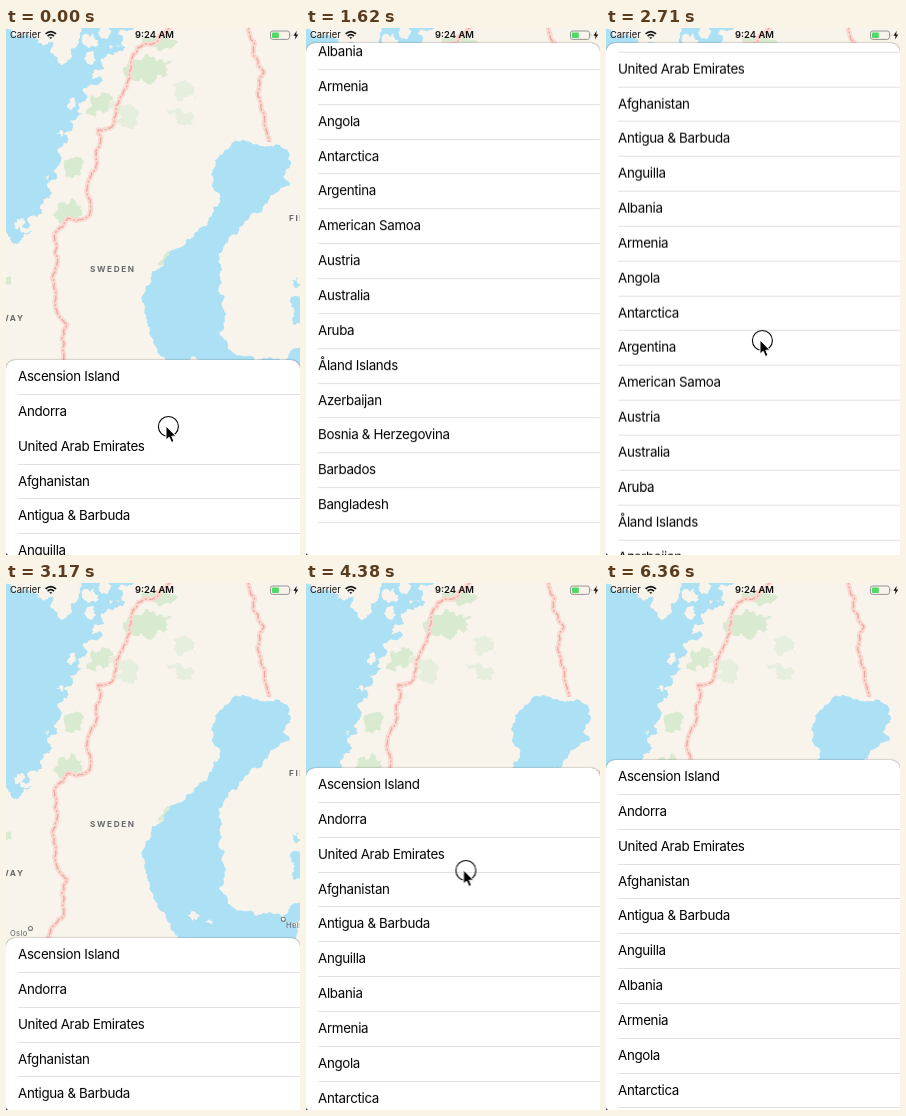
An HTML page that plays this animation: 294 px wide and 527 px high, repeating every 6.46 s.

```html
<!DOCTYPE html>
<html lang="en">
<head>
<meta charset="utf-8">
<title>Map with pull-up list</title>
<style>
  html, body { margin: 0; width: 100%; height: 100%; overflow: hidden; background: #f8f4ec; }
  body { position: relative; font-family: Inter, Roboto, sans-serif; }
  svg { position: absolute; left: 0; top: 0; overflow: visible; }

  .water { fill: #ace1f5; }
  .land { fill: #f8f4ec; }
  .park { fill: #d8ead0; }
  .faint { fill: #e6eedd; }
  .border { fill: none; stroke: #f9d9d1; stroke-width: 5; stroke-linejoin: round; }
  .border.dash { stroke: #eda89f; stroke-width: 1.3; stroke-dasharray: 7 2 2 2; }
  .country { font-weight: 700; font-size: 8.2px; letter-spacing: 1.6px; fill: #68686a; }
  .city { font-weight: 500; font-size: 7.6px; letter-spacing: .3px; fill: #77777a; }
  .dot { fill: #fff; stroke: #77777a; stroke-width: 1.1; }
  .status { font-size: 9.4px; fill: #111; }

  #sheet {
    position: absolute; left: 0; top: 0; width: 100%; height: 600px;
    background: #fff; border-radius: 9px 9px 0 0; overflow: hidden;
    box-shadow: 0 0 1.5px rgba(0, 0, 0, .65);
    animation: sheet 6460ms linear infinite;
  }
  #list {
    margin: 0; padding: 0 0 0 12px; list-style: none;
    font-size: 13.33px; letter-spacing: -.32px; color: #000;
    animation: scroll 6460ms linear infinite;
  }
  #list li {
    box-sizing: border-box; height: 34.85px; line-height: 33.8px;
    border-bottom: 1px solid #e1e1e3; white-space: nowrap;
  }
  #list li:nth-child(2) { animation: divider 6460ms step-end infinite; }

  #corner {
    position: absolute; left: 0; bottom: 0; width: 3px; height: 3px;
    background: radial-gradient(circle at 100% 0, transparent 2.6px, #4c4a6a 3.2px);
  }
  #pointer { width: 1px; height: 1px; animation: pointer 6460ms linear infinite; }
  #ring { fill: none; stroke: #000; stroke-width: 1.1; animation: press 6460ms step-end infinite; }

  @keyframes sheet {
    0%, 13.93% { transform: translateY(332px); }
    15.48% { transform: translateY(308px); }
    17.34% { transform: translateY(234px); }
    19.04% { transform: translateY(110px); }
    20.43%, 43.19% { transform: translateY(15px); }
    45.67% { transform: translateY(170px); }
    47.21% { transform: translateY(325px); }
    48.14% { transform: translateY(364px); }
    49.07% { transform: translateY(355px); }
    51.08% { transform: translateY(340px); }
    53.41% { transform: translateY(333.5px); }
    55.73%, 60.37% { transform: translateY(332px); }
    61.92% { transform: translateY(302px); }
    64.24% { transform: translateY(243px); }
    66.25% { transform: translateY(201px); }
    67.8% { transform: translateY(185px); }
    69.66%, 100% { transform: translateY(177px); }
  }
  @keyframes scroll {
    0%, 20.43% { transform: none; }
    22.45% { transform: translateY(-95px); }
    24.15% { transform: translateY(-200px); }
    25.08% { transform: translateY(-217px); }
    26.63% { transform: translateY(-208px); }
    28.64% { transform: translateY(-192px); }
    30.96% { transform: translateY(-186px); }
    32.04%, 38.39% { transform: translateY(-185px); }
    40.25% { transform: translateY(-145px); }
    43.19%, 100% { transform: none; }
  }
  @keyframes pointer {
    0%, 13% { transform: translate(160px, 398px); }
    17.34% { transform: translate(159px, 245px); }
    20.12% { transform: translate(158px, 110px); }
    22.45% { transform: translate(157px, 28px); }
    23.37% { transform: translate(157px, 2px); }
    24.15%, 29.41% { transform: translate(157px, -30px); }
    30.96% { transform: translate(158px, 90px); }
    32.04% { transform: translate(158px, 141px); }
    32.97% { transform: translate(157px, 151px); }
    35.6%, 38.39% { transform: translate(154px, 172px); }
    43.19% { transform: translate(154px, 360px); }
    47.21% { transform: translate(156px, 532px); }
    48.14%, 54.18% { transform: translate(157px, 560px); }
    57.28% { transform: translate(158px, 470px); }
    59.6%, 60.37% { transform: translate(158px, 441px); }
    61.92% { transform: translate(158px, 400px); }
    64.24% { transform: translate(158px, 335px); }
    66.25% { transform: translate(157.5px, 300px); }
    67.8% { transform: translate(157.5px, 287px); }
    69.66%, 85.3% { transform: translate(157px, 285.5px); }
    90.56%, 100% { transform: translate(302px, 532px); }
  }
  @keyframes press {
    0% { opacity: 1; }
    .93% { opacity: 0; }
    13% { opacity: 1; }
    23.37% { opacity: 0; }
    35.6% { opacity: 1; }
    48.14% { opacity: 0; }
    59.6% { opacity: 1; }
    73.37%, 100% { opacity: 0; }
  }
  @keyframes divider {
    0% { border-color: transparent; }
    13%, 100% { border-color: #e1e1e3; }
  }
</style>
</head>
<body>
<svg width="294" height="527">
  <g id="map"></g>
  <text class="country" x="84" y="244">SWEDEN</text>
  <text class="country" x="283" y="193">FINLAND</text>
  <text class="country" x="18.5" y="292.5" text-anchor="end">NORWAY</text>
  <text class="city" x="4" y="353">Oslo</text>
  <circle class="dot" cx="24.5" cy="345.5" r="2"/>
  <text class="city" x="280" y="345">Helsinki</text>
  <circle class="dot" cx="277.3" cy="336.3" r="2"/>

  <g class="status">
    <text x="4" y="10.4">Carrier</text>
    <text x="148.5" y="10.4" text-anchor="middle" font-weight="600">9:24 AM</text>
  </g>
  <g fill="none" stroke="#111" stroke-width="1.7">
    <path d="M39.6 5.9Q44.8 1.3 50 5.9M41.6 8.1Q44.8 5.3 48 8.1"/>
    <path d="M43.2 9.3H46.4L44.8 11z" fill="#111" stroke="none"/>
  </g>
  <rect x="264.5" y="3" width="19" height="8.4" rx="2.2" fill="none" stroke="#8b8b88" stroke-width=".9"/>
  <rect x="266" y="4.4" width="6.8" height="5.6" rx=".8" fill="#4cd964"/>
  <path d="M284.8 5.6q1.5 1.5 0 3z" fill="#8b8b88"/>
  <path d="M290.8 2.8L287.4 7.7H289.6L288.9 11.4L292.3 6.4H290.1z" fill="#111"/>
</svg>

<div id="sheet"><ul id="list"></ul></div>
<i id="corner"></i>

<svg id="pointer">
  <circle id="ring" cx="2.4" cy=".5" r="10"/>
  <path d="M0 0V14L3.2 11.2L5.5 16.4L8 15.4L5.8 10.2H10z" fill="#000" stroke="#fff" stroke-width="1"/>
</svg>

<script>
  const countries = `Ascension Island, Andorra, United Arab Emirates, Afghanistan, Antigua & Barbuda,
    Anguilla, Albania, Armenia, Angola, Antarctica, Argentina, American Samoa, Austria, Australia,
    Aruba, Åland Islands, Azerbaijan, Bosnia & Herzegovina, Barbados, Bangladesh`;
  for (const name of countries.split(/,\s*/)) {
    const row = document.createElement('li');
    row.textContent = name;
    document.getElementById('list').append(row);
  }

  let seed = 11;
  const random = () => (seed = seed * 16807 % 2147483647) / 2147483647;

  // Splits a line into shorter pieces, pushing each midpoint sideways.
  function split(a, b, amount) {
    const dx = b[0] - a[0], dy = b[1] - a[1];
    if (Math.hypot(dx, dy) < 2.4) return [b];
    const k = (random() - .5) * amount;
    const mid = [(a[0] + b[0]) / 2 - dy * k, (a[1] + b[1]) / 2 + dx * k];
    return [...split(a, mid, amount), ...split(mid, b, amount)];
  }

  function draw(kind, text, amount, closed = true) {
    const pts = text.trim().split(/\s+/).map(p => p.split(',').map(Number));
    const line = [pts[0]];
    pts.forEach((p, i) => { if (i) line.push(...split(pts[i - 1], p, amount)); });
    if (closed) line.push(...split(pts[pts.length - 1], pts[0], amount));
    const d = 'M' + line.map(p => p.map(v => v.toFixed(1))).join('L') + (closed ? 'z' : '');
    for (const name of [].concat(kind)) {
      const path = document.createElementNS('http://www.w3.org/2000/svg', 'path');
      path.setAttribute('class', name);
      path.setAttribute('d', d);
      document.getElementById('map').append(path);
    }
  }

  // Parks
  draw('park', '122,54 126,33 139,26 150,33 166,32 162,47 148,54 136,50', .7);
  draw('faint', '166,56 180,52 189,60 190,72 178,69', .8);
  draw('faint', '100,78 112,74 130,92 128,101 110,96', .8);
  draw('faint', '160,80 176,82 187,100 172,96', .8);
  draw('park', '84,70 95,64 105,68 103,84 90,90 80,86', .8);
  draw('park', '58,132 70,128 76,139 68,149 59,147', .7);
  draw('park', '52,178 66,170 76,178 72,190 54,196', .8);
  draw('park', '152,237 158,227 166,222 162,233', .5);
  draw('park', '-4,247 4,248 5,257 -4,259', .5);
  draw('park', '136,14 148,8 172,14 160,20 146,18', .7);

  // Western sea, its islands and inlets
  draw('water', `-12,-12 130,-12 122,3 112,5 117,13 104,17 108,27 95,30 98,41 86,46 88,56
    78,60 80,71 72,76 76,86 64,92 67,100 58,106 61,116 52,124 55,134 48,142 50,152
    42,160 44,170 34,178 36,186 24,188 28,197 14,200 18,208 6,212 -12,204`, .75);
  for (const spot of ['76,14 88,6 92,12 82,20', '92,4 102,0 104,7 96,11', '78,30 88,24 90,32 82,36',
    '62,76 69,71 70,79 64,82', '50,106 55,102 56,109', '38,150 43,147 43,155', '8,196 16,190 19,195 10,201'])
    draw('land', spot, .8);
  draw('water', '104,22 116,17 121,20 110,25', .5);
  draw('water', '84,52 95,49 97,53 88,57', .5);
  draw('water', '4,211 12,205 26,203 16,209 8,216', .6);

  // Gulf, lakes and islands
  draw('water', `214,127 225,117 240,113 255,118 270,116 283,125 285,136 277,149 284,157 270,165
    262,175 246,185 238,196 222,210 213,225 216,241 212,260 217,280 213,306 222,321 236,328
    250,333 264,329 276,335 308,320 308,420 186,420 172,354 165,340 158,329 149,318 143,305
    138,285 139,264 145,254 147,243 158,232 166,222 180,212 192,203 203,190 207,180 214,174
    211,164 207,154 208,140`, .45);
  draw('land', '181,332 188,328 194,333 187,338', .8);
  draw('land', '200,338 204,336 206,341', .8);
  draw('water', '284,272 290,268 298,276 296,296 286,292 289,283', .8);
  draw('water', '286,252 292,249 297,257 289,260', .8);

  // Frontiers
  const frontier = ['border', 'border dash'];
  draw(frontier, `165,-4 156,6 151,14 139,16 128,26 124,50 117,65 110,82 107,97 92,102 90,130 84,150
    81,165 85,180 80,190 62,190 49,205 51,235 48,260 51,285 61,296 57,322 56,335 45,346 40,360`, .3, false);
  draw(frontier, '239,-4 248,14 247,26 258,44 253,60 255,76 258,96 263,114', .3, false);
</script>
</body>
</html>
```
